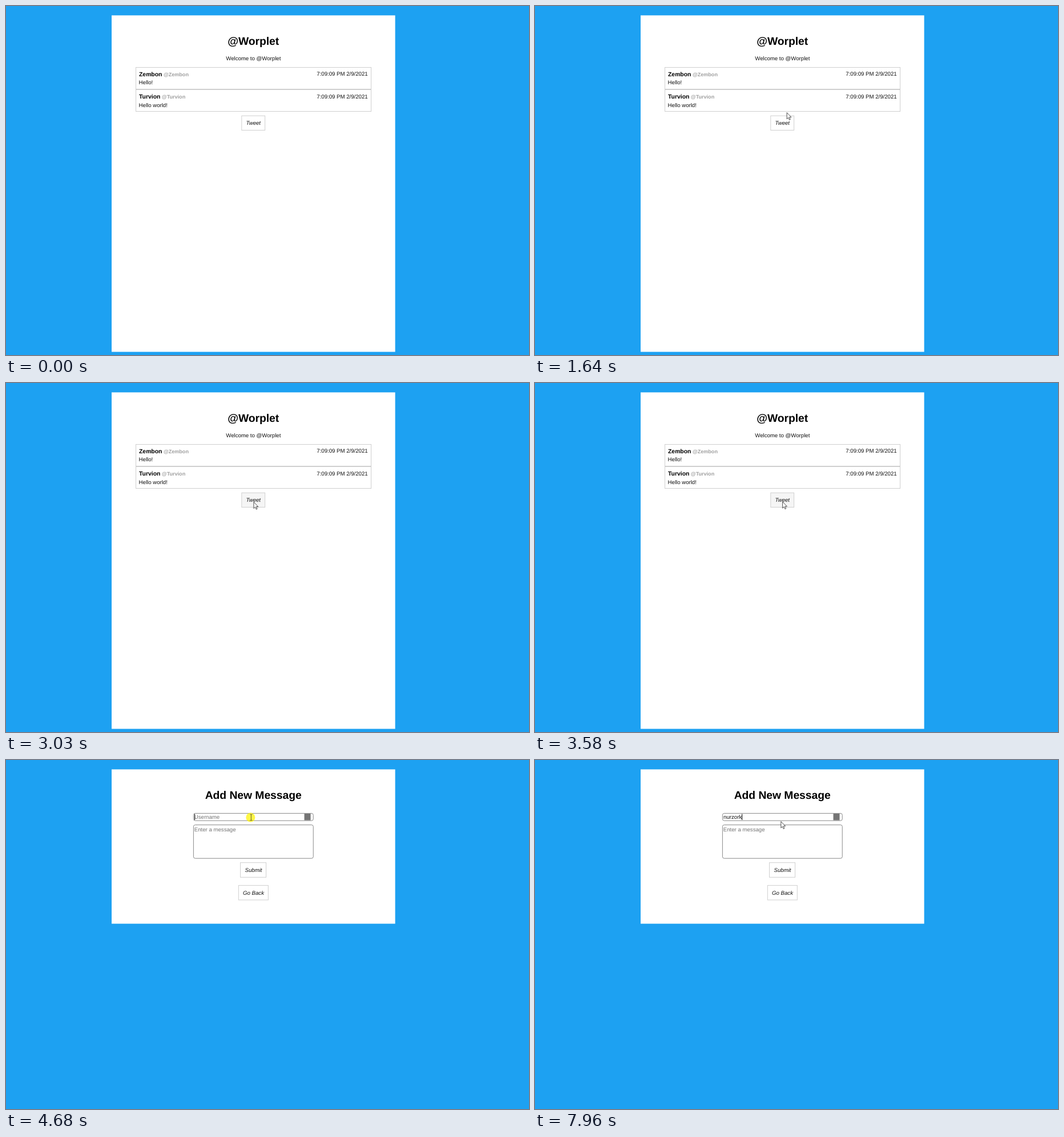
Animation, 916 px wide and 611 px high, one loop 8 s. Source, as an HTML page:

```html
<!DOCTYPE html>
<html lang="en">
<head>
<meta charset="utf-8">
<title>Message board</title>
<style>
  html, body { margin: 0; width: 100%; height: 100%; overflow: hidden; background: #1da1f2; }
  svg { display: block; width: 100vw; height: 100vh; }
  text { font: 9.65px "Liberation Sans", Arial, sans-serif; fill: #111; text-rendering: geometricPrecision; white-space: pre; }
  .mid { text-anchor: middle; }
  .end { text-anchor: end; }
  .title { font-size: 19.25px; font-weight: bold; fill: #000; }
  .name { font-size: 10.4px; font-weight: bold; fill: #000; }
  .handle { font-size: 9.05px; fill: #a0a0a0; }
  .label { font-style: italic; }
  .hint { fill: #757575; }
  .box { fill: #fff; stroke: #cfcfcf; }
  .box.hot { fill: #f5f5f5; }
  .field { fill: #fff; stroke: #7c7c7c; stroke-width: .9; }
</style>
</head>
<body>
<svg viewBox="0 0 916 611">
  <rect width="916" height="611" fill="#1da1f2"/>
  <g id="feed">
    <rect x="185" y="16.4" width="496.6" height="589.1" fill="#fff"/>
    <text class="title mid" x="433.2" y="68.2">@Worplet</text>
    <text class="mid" x="433.3" y="95">Welcome to @Worplet</text>
    <rect class="box" x="227.5" y="107.5" width="412" height="38"/>
    <text class="name" x="233" y="123.1">Zembon<tspan class="handle"> @Zembon</tspan></text>
    <text class="end" x="633.7" y="122.4">7:09:09 PM 2/9/2021</text>
    <text x="232.6" y="137.4">Hello!</text>
    <rect class="box" x="227.5" y="146.5" width="412" height="38"/>
    <text class="name" x="233" y="162.2">Turvion<tspan class="handle"> @Turvion</tspan></text>
    <text class="end" x="633.7" y="161.5">7:09:09 PM 2/9/2021</text>
    <text x="232.6" y="176.5">Hello world!</text>
    <rect class="box" x="412.8" y="192.2" width="40.8" height="25.3"/>
    <text class="label mid" x="433.3" y="208.3">Tweet</text>
  </g>
  <g id="form">
    <rect x="185" y="16.4" width="496.6" height="270.2" fill="#fff"/>
    <text class="title mid" x="433.2" y="68.2">Add New Message</text>
    <rect class="field" x="328.4" y="93.4" width="209.8" height="12.8" rx="3"/>
    <rect class="field" x="328.4" y="113.6" width="209.8" height="58.6" rx="3"/>
    <text class="hint" id="hint" x="329.8" y="103.3">Username</text>
    <text class="hint" x="329.8" y="124.5">Enter a message</text>
    <text id="typed" x="330.1" y="103.3"></text>
    <rect id="caret" y="94.5" width="1" height="10.5" fill="#000"/>
    <rect id="badge" x="522.5" y="94" width="11" height="11.5" fill="#757575"/>
    <rect class="box" x="410.5" y="179.7" width="45" height="25.6"/>
    <text class="label mid" x="433.5" y="196">Submit</text>
    <rect class="box" x="407.3" y="219.6" width="52" height="25.4"/>
    <text class="label mid" x="433.5" y="236">Go Back</text>
  </g>
  <g id="pointer">
    <circle id="glow" cx="-1" r="8" fill="#fff200" fill-opacity=".72"/>
    <path id="arrow" d="M.4 .4V11.6L3 9.2L4.7 13.2L6.5 12.4L4.8 8.5H8.2Z" fill="#fff" stroke="#222" stroke-width=".8"/>
    <path id="beam" d="M-2 -5.2H-.6L0 -4.6L.6 -5.2H2M0 -4.6V4.6M-2 5.2H-.6L0 4.6L.6 5.2H2" fill="none" stroke="#333" stroke-width=".8"/>
  </g>
</svg>
<script>
const LOOP = 8000, STEP = 78;
const PAGE_AT = 3660, FOCUS_AT = 4600;
const USER = "nurzork";
const KEYS = [6630, 6710, 6860, 7250, 7720, 7800, 7960];
const CLICKS = [[3430, 3580], [FOCUS_AT, 4760]];

// time, x, y of the pointer
const PATH = [
  [70, 869, 588], [230, 800, 440], [390, 700, 250], [540, 600, 130],
  [690, 515, 45], [770, 490, 26], [850, 478, 50], [930, 469.3, 102.3],
  [1090, 455, 150], [1250, 444, 185], [1470, 438, 199], [1560, 438, 199],
  [1640, 441, 185], [1880, 449, 133], [2260, 436.7, 180], [2420, 435, 203],
  [2490, 433.5, 208], [2960, 433.5, 208], [3020, 433.2, 207.5],
  [3980, 433.2, 207.5], [4050, 433, 200], [4290, 431, 140],
  [4590, 429.3, 100.5], [4840, 429.3, 100.5], [4900, 430.4, 107.3]
];

const $ = id => document.getElementById(id);
const [feed, form, hint, typed, caret, badge, pointer, glow, arrow, beam] =
  ["feed", "form", "hint", "typed", "caret", "badge", "pointer", "glow", "arrow", "beam"].map($);
const boxes = [...document.querySelectorAll(".box")];
const fields = [...document.querySelectorAll(".field")];

const show = (el, on) => el.setAttribute("display", on ? "inline" : "none");
const within = (t, [a, b]) => t >= a && t < b;

function inside(el, x, y) {
  const { x: left, y: top, width, height } = el.getBBox();
  return x >= left && x <= left + width && y >= top && y <= top + height;
}

function locate(t) {
  const i = PATH.findIndex(p => p[0] > t);
  if (i < 0) return PATH[PATH.length - 1].slice(1);
  if (i === 0) return PATH[0].slice(1);
  const [t0, x0, y0] = PATH[i - 1], [t1, x1, y1] = PATH[i];
  const f = (t - t0) / (t1 - t0);
  return [x0 + (x1 - x0) * f, y0 + (y1 - y0) * f];
}

function caretOn(t) {
  if (t < FOCUS_AT) return false;
  return t < 5140 || within(t, [5690, 6240]) || t >= KEYS[0];
}

function draw(t) {
  const [x, y] = locate(Math.floor((t + 10) / STEP) * STEP - 5);
  const onForm = t >= PAGE_AT, focused = t >= FOCUS_AT;
  show(feed, !onForm);
  show(form, onForm);

  const count = KEYS.filter(k => t >= k).length;
  typed.textContent = USER.slice(0, count);
  show(hint, count === 0);
  show(badge, focused);
  show(caret, caretOn(t));
  caret.setAttribute("x", 330 + (count ? typed.getComputedTextLength() : 0));

  const page = onForm ? form : feed;
  for (const b of boxes)
    b.classList.toggle("hot", t >= 70 && page.contains(b) && inside(b, x, y));

  const overField = onForm && fields.some(f => inside(f, x, y));
  show(pointer, t >= 70);
  pointer.setAttribute("transform", `translate(${x} ${y})`);
  show(arrow, !overField);
  show(beam, overField);
  show(glow, CLICKS.some(c => within(t, c)));
}

const start = performance.now();
function tick() {
  draw((performance.now() - start) % LOOP);
  requestAnimationFrame(tick);
}
tick();
</script>
</body>
</html>
```
